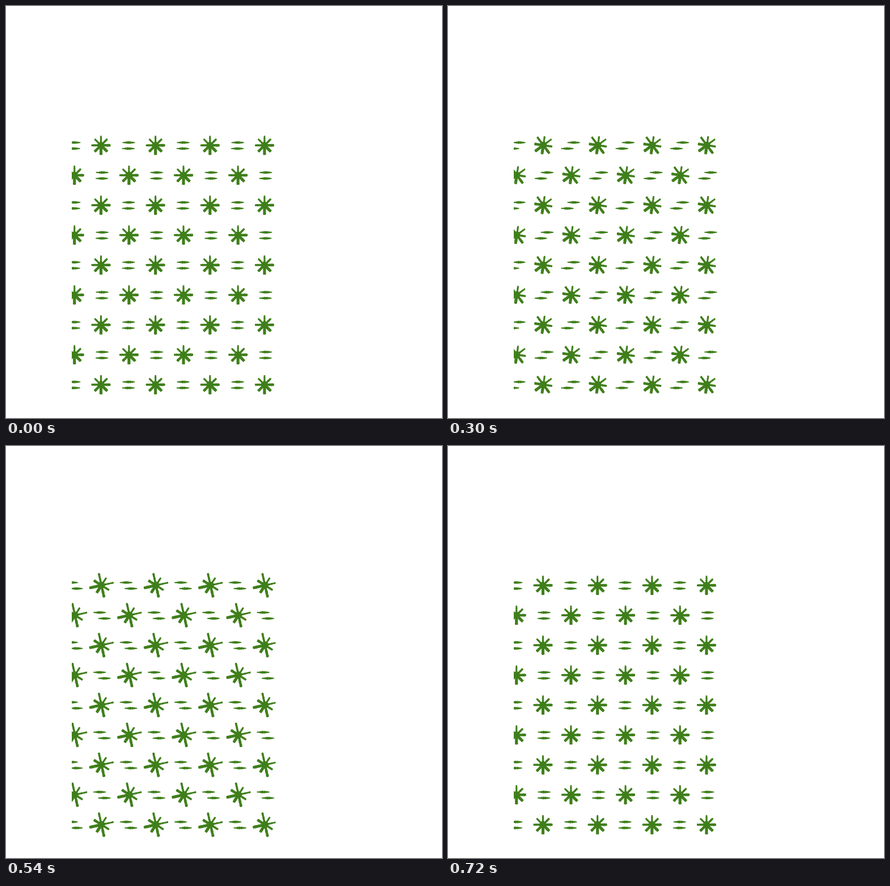
Animation of 769 by 728 pixels, one loop 0.93 s. Source, as an HTML page with a canvas:

```html
<!DOCTYPE html>
<html lang="en">
<head>
<meta charset="utf-8">
<title>Swinging stars</title>
<style>
  html, body { margin: 0; width: 100%; height: 100%; overflow: hidden; background: #fff; }
  canvas { display: block; }
</style>
</head>
<body>
<canvas id="stage" width="769" height="728"></canvas>
<script>
const ctx = document.getElementById("stage").getContext("2d");
const LOOP = 930, STEP = 30, HALF = 12;
const COL = 96.15, ROW = 52.87;

// Repeatable roughness in -1..1
const rough = n => {
  const v = Math.sin(n * 127.1 + 3.7) * 43758.5453;
  return (v - Math.floor(v)) * 2 - 1;
};

// Spindle with a ragged outline, centred on the origin
function makeDash() {
  const path = new Path2D();
  for (let x = -11.5; x < 11.5; x++) {
    const taper = Math.pow(1 - Math.abs(x + 0.5) / 12, 0.6);
    const h = 4.7 * taper + 0.6 * rough(x);
    path.rect(x, -h / 2, 1.05, h);
  }
  return path;
}

// Eight ragged arms; the straight ones reach further than the diagonals
function makeStar(reach) {
  const path = new Path2D();
  path.arc(0, 0, 6.3, 0, Math.PI * 2);
  for (let i = 0; i < 8; i++) {
    const angle = i * Math.PI / 4;
    const width = 4.2 + 1.1 * Math.cos(angle - Math.PI * 0.375);
    const length = i % 2 ? 16 : reach;
    const arm = new Path2D();
    for (let x = 0; x < length; x++) {
      const slice = Math.min(1.1, length - x);
      const cap = Math.min(1, (length - x + 0.8) / 2.2);
      const w = width * cap + 0.4 * rough(x + i * 31);
      arm.rect(x, -w / 2, slice, w);
    }
    path.addPath(arm, new DOMMatrix().rotate(i * 45));
  }
  return path;
}

const dash = makeDash();

function stamp(path, x, y, angle = 0) {
  ctx.save();
  ctx.translate(x, y);
  ctx.rotate(angle);
  ctx.fill(path);
  ctx.restore();
}

function draw(time) {
  const step = Math.floor((time % LOOP) / STEP);
  const phase = step < 2 * HALF ? step : 0;
  const back = phase >= HALF;
  const u = (phase % HALF) / HALF;

  const turn = Math.pow(u, 2.85);
  const angle = (back ? 1 - turn : turn) * Math.PI / 2;
  const slide = (back ? -6.4 : 6.4) * Math.sin(Math.PI * u * u) + 0.3;
  const star = makeStar(17 + 5 * Math.sin(Math.PI * u) ** 2);

  // The turning point lies slightly off the star's middle
  const dx = -0.5 * Math.cos(angle) + 0.5 * Math.sin(angle);
  const dy = -0.5 * Math.cos(angle) - 0.5 * Math.sin(angle);

  ctx.clearRect(0, 0, 769, 728);
  ctx.save();
  ctx.beginPath();
  ctx.rect(116, 223, 359.5, 470);
  ctx.clip();
  ctx.fillStyle = "#3f7f1b";
  for (let row = 0; row < 9; row++) {
    const y = 246.7 + row * ROW;
    const shift = row % 2 ? 49.4 : 0;
    for (let col = -1; col < 4; col++) {
      const x = 168 + shift + col * COL;
      stamp(star, x + dx, y + dy, angle);
      const mid = 119.9 + shift + col * COL;
      stamp(dash, mid + slide, y - 5.4);
      stamp(dash, mid - slide, y + 5.2);
    }
  }
  ctx.restore();
}

const start = performance.now();
function tick() {
  draw(performance.now() - start);
  requestAnimationFrame(tick);
}
tick();
</script>
</body>
</html>
```
